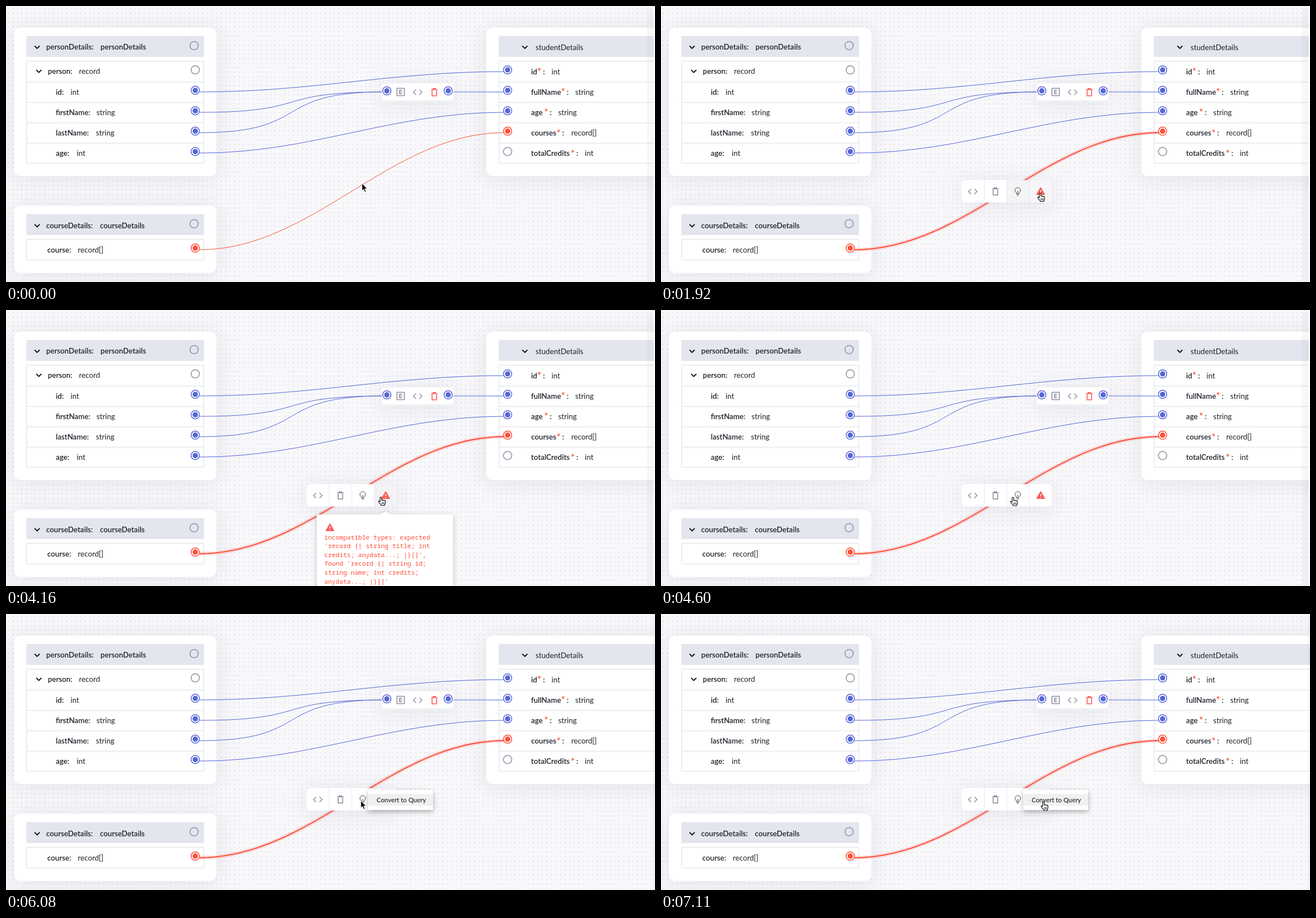
These frames come from a looping animation (1147 px wide and 488 px high, 8000 ms). An HTML page:

```html
<!DOCTYPE html>
<html lang="en">
<head>
<meta charset="utf-8">
<title>Data mapper</title>
<style>
  html, body { margin: 0; width: 100%; height: 100%; overflow: hidden; }
  body { background: #f8f8fb radial-gradient(circle at 4px 5px, #dadce5 .6px, transparent 1px) 0 0 / 8px 8px; }
  svg { display: block; width: 1147px; height: 488px; }
  text { font: 13.2px Lato, "Open Sans", sans-serif; fill: #1d2028; white-space: pre; }
  .b { font-weight: 600; }
  .star { font-size: 17px; font-weight: 600; fill: #ff4d38; }
  .menu { font-size: 11.3px; font-weight: 500; }
  .mono { font: 500 11.13px "Noto Sans Mono", "DejaVu Sans Mono", monospace; fill: #ff4d38; }
  .soft { filter: drop-shadow(0 4px 20px rgba(102, 103, 133, .15)); }
  .pop { filter: drop-shadow(0 2px 4px rgba(0, 0, 0, .22)); }
  .menubox { filter: drop-shadow(0 3px 4px rgba(0, 0, 0, .3)); }
  .line { fill: none; stroke: #dcdfe8; }
  .grey { fill: none; stroke: #8d91a3; stroke-width: 1.5; }
  .chev { fill: none; stroke: #14161c; stroke-width: 1.8; stroke-linecap: round; stroke-linejoin: round; }
  .link { fill: none; stroke: #5567d5; stroke-width: 1; }
</style>
</head>
<body>
<svg id="stage" viewBox="0 0 1147 488">
  <defs>
    <g id="code" class="grey"><path d="M-3-4.5L-7.5 0L-3 4.5M3-4.5L7.5 0L3 4.5"/></g>
    <g id="trash" fill="none" stroke-width="1.6"><path d="M-5.5-4.7H5.5M-2.2-5V-6.4H2.2V-5M-4-3.8V6.2H4V-3.8"/></g>
    <g id="warn">
      <path d="M0-6L6.7 5.6H-6.7Z" fill="#fa5a58" stroke="#fa5a58" stroke-width="1.8" stroke-linejoin="round"/>
      <path d="M0-2.3V1.8M0 3.2V4.7" stroke="#fff" stroke-width="1.5"/>
    </g>
    <g id="bulb" fill="none" stroke="#4a4d56">
      <circle cy="-2" r="4.9"/>
      <path d="M-1.9 2.6V5H1.9V2.6M-1.3 7H1.3M-1.8-.8L0 .6L1.8-.8"/>
    </g>
    <clipPath id="item"><rect x="640" y="318" width="115" height="21"/></clipPath>
  </defs>
  <g id="cards"></g>
  <g id="links"></g>
  <g id="ports"></g>

  <g id="tools">
    <rect class="soft" x="531" y="308" width="160" height="39.5" rx="8" fill="#fff"/>
    <rect id="bulbHover" x="611" y="308" width="40" height="39.5" fill="#ededf0"/>
    <path id="warnHover" d="M651 308H683a8 8 0 0 1 8 8V339.5a8 8 0 0 1-8 8H651Z" fill="#f3f3f6"/>
    <path class="line" d="M571.5 308V347.5M611 308V347.5M651 308V347.5" stroke-opacity=".7"/>
    <use href="#code" x="551" y="328"/>
    <use href="#trash" x="591" y="328" stroke="#8d91a3"/>
    <use href="#bulb" x="630.5" y="328"/>
    <use href="#warn" x="671" y="327.5"/>
  </g>

  <g id="tip">
    <path class="pop" d="M551 361.5H661L671 356L681 361.5H788a2 2 0 0 1 2 2V500H549V363.5a2 2 0 0 1 2-2Z" fill="#fff"/>
    <use href="#warn" x="572.5" y="384.5"/>
  </g>

  <g id="menu">
    <rect class="menubox" x="640" y="311" width="115" height="35.5" rx="2.5" fill="#fff"/>
    <rect x="640" y="318" width="115" height="21" fill="#f0f0f0"/>
    <circle id="ripple" cx="677" cy="332" clip-path="url(#item)"/>
    <text class="menu" x="655" y="332.5">Convert to Query</text>
  </g>

  <rect id="shade" y="5" width="20" height="483" fill="#20243c" opacity=".035"/>
  <rect id="edge" x="1145" width="2" height="488" fill="#fff"/>

  <path id="arrow" d="M0 0V13.2L3 10.4L5.2 15.4L7.4 14.4L5.3 9.6H9.5Z" fill="#000" stroke="#fff" stroke-width="1"/>
  <g id="hand" stroke="#000" stroke-linecap="round" stroke-linejoin="round">
    <path d="M5 1.2C6 1.2 6.4 2 6.4 2.8V6.8C6.7 6.2 8.4 6.1 8.7 7.1C9.2 6.4 10.7 6.6 10.9 7.6C11.5 7 12.9 7.3 12.9 8.5V11.5C12.9 13 11.7 13.7 11.6 16H5.4C5.1 14 2.8 12.8 1 9.8C.3 8.7 1.6 7.8 2.6 8.5L3.6 9.5V2.8C3.6 1.9 4.1 1.2 5 1.2Z" fill="#fff" stroke-width="1.1"/>
    <path d="M6.6 10.8V13.6M8.5 10.8V13.6M10.4 10.8V13.6" stroke-width=".8"/>
  </g>
</svg>
<script>
const $ = id => document.getElementById(id);
const BLUE = '#5567d5', RED = '#ff4d38';
const BEND = 200;

function add(parent, tag, attrs, label) {
  const el = document.createElementNS('http://www.w3.org/2000/svg', tag);
  for (const key in attrs) el.setAttribute(key, attrs[key]);
  if (label) el.textContent = label;
  $(parent).append(el);
  return el;
}
const text = (x, y, label, cls = '') => add('cards', 'text', { x, y, class: cls }, label);
const chevron = (x, y) => add('cards', 'path', { class: 'chev', d: `M${x - 4} ${y - 2}l4 4l4-4` });

function port(x, y, color) {
  add('ports', 'circle', { cx: x, cy: y, r: 7.3, fill: color ? '#fff' : 'none', stroke: color || '#8d91a3', 'stroke-width': 1.5 });
  if (color) add('ports', 'circle', { cx: x, cy: y, r: 4.7, fill: color });
}

function card(x, y, width, rows) {
  const inner = width - 44, top = y + 60;
  const height = rows * 36 + 83;
  add('cards', 'rect', { class: 'soft', x, y, width, height, rx: 12, fill: '#fff' });
  add('cards', 'rect', { x: x + 22, y: y + 15, width: inner, height: 37, fill: '#e4e6ef' });
  add('cards', 'rect', { class: 'line', x: x + 22.5, y: top - .5, width: inner - 1, height: rows * 36 + .5, rx: 1 });
  for (let i = 1; i < rows; i++)
    add('cards', 'path', { class: 'line', d: `M${x + 22} ${top + i * 36 + .5}h${inner}` });
}

function link(x1, y1, x2, y2, style = '') {
  const d = `M${x1} ${y1}C${x1 + BEND} ${y1} ${x2 - BEND} ${y2} ${x2} ${y2}`;
  return add('links', 'path', { class: 'link', d, style });
}

card(14, 38, 358, 5);
card(14, 353, 358, 1);
card(849, 38, 400, 5);

chevron(55, 73);
text(71, 77, 'personDetails:', 'b');
text(167, 77, 'personDetails', 'b');
chevron(58, 115.5);
chevron(55, 388.5);
text(71, 393, 'courseDetails:', 'b');
text(166, 393, 'courseDetails', 'b');
chevron(917, 73);
text(936, 77.5, 'studentDetails');

// label x, baseline, name, type x, type
[
  [74, 120, 'person:', 129, 'record'],
  [88, 157, 'id:', 114, 'int'],
  [88, 193, 'firstName:', 160, 'string'],
  [88, 229, 'lastName:', 159, 'string'],
  [88, 265, 'age:', 125, 'int'],
  [73, 436, 'course:', 127, 'record[]']
].forEach(([x, y, name, tx, type]) => {
  text(x, y, name, 'b');
  text(tx, y, type);
});

// name, star x, type x, type
[
  ['id', 939, 964, 'int'],
  ['fullName', 981, 1006, 'string'],
  ['age', 951, 976, 'string'],
  ['courses', 973, 999, 'record[]'],
  ['totalCredits', 998, 1023, 'int']
].forEach(([name, sx, tx, type], i) => {
  const y = 120.5 + i * 36.2;
  text(928, y, name, 'b');
  text(sx, y + 1.5, '*', 'star');
  text(sx + 10, y, ':', 'b');
  text(tx, y, type);
});

link(342, 152, 880, 116);
link(342, 188, 667, 152);
link(342, 224, 667, 152);
link(342, 260, 880, 188);
add('links', 'path', { class: 'link', d: 'M787 152H880' });
const glow = link(342, 431, 880, 224, `stroke:${RED};stroke-width:7;stroke-opacity:.16`);
const wire = link(342, 431, 880, 224, `stroke:${RED}`);

add('links', 'rect', { class: 'soft', x: 664, y: 137, width: 127, height: 30, rx: 6, fill: '#fff' });
add('links', 'path', { class: 'grey', d: 'M691 145.5h13v13h-13zM700 148.7h-4.5v6.6h4.5M695.5 152h4' });
add('links', 'use', { href: '#code', x: 727.5, y: 152.5 });
add('links', 'use', { href: '#trash', x: 757, y: 152.5, stroke: '#fd5d55' });

port(332.5, 70);
port(334.5, 113);
port(332.5, 385);
port(334.5, 428, RED);
port(673, 150, BLUE);
port(781.5, 150, BLUE);
for (let i = 0; i < 5; i++) {
  const y = 113 + i * 36.1;
  if (i) port(334.5, y, BLUE);
  port(886.5, y, [BLUE, BLUE, BLUE, RED][i]);
}

[
  'incompatible types: expected',
  "'record {| string title; int",
  'credits; anydata...; |}[]\',',
  "found 'record {| string id;",
  'string name; int credits;',
  "anydata...; |}[]'"
].forEach((row, i) => add('tip', 'text', { class: 'mono', x: 562.5, y: 405.5 + i * 15.6 }, row));

// Each table is a list of steps: start time, then the values held from there on.
const LOOP = 8000;
const cursor = [
  [0, 'arrow', 629, 313.5], [300, 'arrow', 627, 317.5], [440, 'hand', 624.5, 316],
  [1490, 'hand', 627, 315.5], [1630, 'hand', 637, 320.5], [1780, 'hand', 661, 328],
  [1920, 'hand', 665, 329.5], [4160, 'hand', 657.5, 329.5], [4310, 'hand', 624, 330.5],
  [4450, 'hand', 622, 330.5], [4600, 'hand', 617, 330], [5050, 'hand', 619.5, 330],
  [5200, 'hand', 620.5, 330], [5490, 'arrow', 624.5, 330], [6080, 'arrow', 627, 330],
  [6230, 'arrow', 666, 333], [6380, 'hand', 671, 331]
];
const tools = [[0, 0], [300, 1]];
const bulbHover = [[0, 0], [300, 1], [1780, .6], [2220, 0]];
const warnHover = [[0, 0], [1920, .7], [2220, 1], [4310, 0]];
const tip = [[0, 0], [2220, .85], [2370, 1], [4450, .12], [4600, 0]];
const menu = [[0, 0, 1, 1], [5490, .55, .895, .83], [5640, 1, 1, 1]];
const ripple = [[0, 0, 0], [6820, 55, .06], [6970, 90, .06], [7110, 0, 0]];

const at = (steps, t) => steps.findLast(s => s[0] <= t).slice(1);

function fade(id, opacity) {
  $(id).style.opacity = opacity;
  $(id).style.display = opacity ? '' : 'none';
}

function draw(now) {
  const t = now % LOOP;
  for (const [id, steps] of Object.entries({ tools, bulbHover, warnHover, tip })) fade(id, at(steps, t)[0]);

  const active = t >= 300;
  glow.style.display = active ? '' : 'none';
  wire.style.strokeWidth = active ? 2 : 1;

  const [alpha, sx, sy] = at(menu, t);
  fade('menu', alpha);
  $('menu').setAttribute('transform', `translate(640 328.5) scale(${sx} ${sy}) translate(-640 -328.5)`);
  const [r, strength] = at(ripple, t);
  $('ripple').setAttribute('r', r);
  fade('ripple', strength);

  const wide = t >= 5490;
  $('shade').setAttribute('x', wide ? 1143 : 1133);
  fade('edge', wide ? 0 : 1);

  const [kind, x, y] = at(cursor, t);
  for (const id of ['arrow', 'hand']) fade(id, id === kind ? 1 : 0);
  $(kind).setAttribute('transform', `translate(${x} ${y})`);
}

const start = performance.now();
(function tick() {
  draw(performance.now() - start);
  requestAnimationFrame(tick);
})();
</script>
</body>
</html>
```
